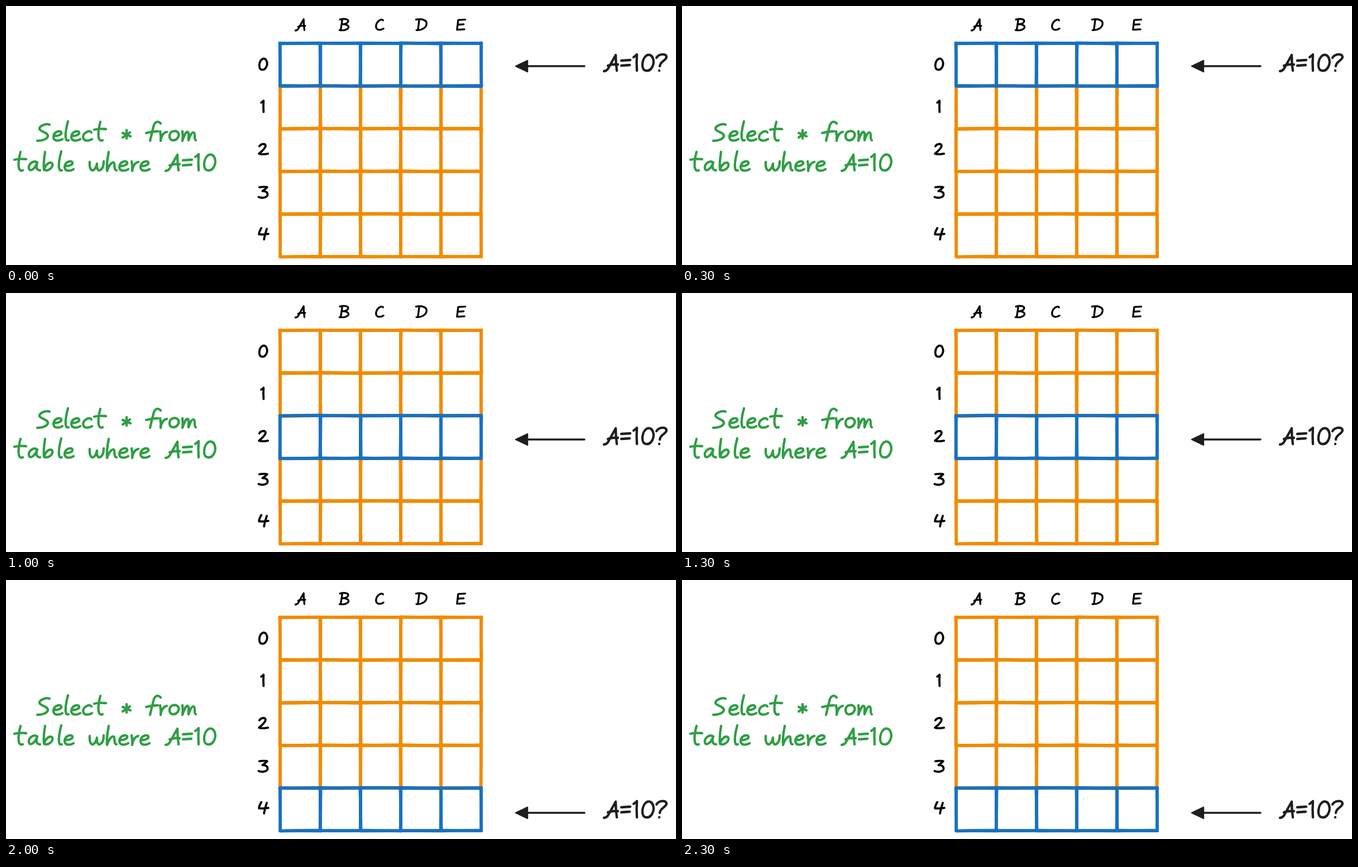
An HTML page with a canvas that plays this animation: 1200 px wide and 465 px high, repeating every 2500 ms.

```html
<!DOCTYPE html>
<html lang="en">
<head>
<meta charset="utf-8">
<title>Table scan</title>
<style>
html, body { margin: 0; width: 100%; height: 100%; overflow: hidden; background: #fff; }
canvas { display: block; }
</style>
</head>
<body>
<canvas id="stage" width="1200" height="465" role="img" aria-label="Select * from table where A=10"></canvas>
<script>
const ctx = document.getElementById('stage').getContext('2d');
const ORANGE = '#f08c00', BLUE = '#1971c2', GREEN = '#2f9e44', INK = '#1e1e1e';
const STEP = 500, ROWS = 5, COLS = 5;
const LEFT = 491, TOP = 67, CELL_W = 72, CELL_H = 76.6;

// Handwritten pen strokes: [advance, path], baseline at y = 0
const lower = {
  a: [26, 'M18-15C11-20 2-12 3-5C4 3 14-3 18-15C15-6 17-1 23-1'],
  b: [28, 'M6-34C4-22 3-10 4-2C6-10 13-17 18-14C23-8 12 2 4-2'],
  c: [20, 'M17-15C14-20 3-15 2-7C2 1 12 1 18-3'],
  e: [21, 'M3-9C9-8 17-11 16-15C14-20 2-16 2-7C2 1 12 1 18-3'],
  f: [23, 'M27-31C22-37 16-34 14-25L8 0M1-14C8-16 16-17 22-17'],
  h: [23, 'M6-34C4-24 2-10 3 0C5-8 11-16 15-15C18-13 14-2 20-1'],
  l: [11, 'M7-35C4-24 2-12 3-5C4-1 5 0 8-1'],
  m: [30, 'M3-17C4-10 4-6 3 0C6-10 10-16 12-16C16-15 13-6 14-1C17-10 20-16 23-15C27-14 23-2 27-1'],
  o: [23, 'M10-17C2-17 0-3 8-1C17 0 22-10 18-15C15-18 12-18 10-17'],
  r: [17, 'M3-17Q5-8 4 0Q6-14 15-16'],
  t: [25, 'M13-34C10-24 8-8 11-3Q13 1 17-1M2-20Q12-22 23-21'],
  w: [30, 'M2-16C1-6 4 0 8-1C12-3 14-8 15-13C14-4 17 0 20-1C25-3 27-10 27-17']
};
const upper = {
  A: [30, 'M2 0Q6 0 9-4L23-29Q23-15 25-1M9-10Q18-13 27-12'],
  B: [30, 'M9-28L5-1M3-28C14-32 26-29 24-23C22-18 16-16 9-16C20-17 28-11 24-6C18 0 8 0 2-1'],
  C: [24, 'M22-26C16-33 3-20 4-9C5 1 17-1 23-5'],
  D: [32, 'M10-27L7-2M2-28C16-31 30-27 29-17C28-7 16 0 3-1'],
  E: [28, 'M25-28L7-27L4-2L23-3M6-15L21-16'],
  S: [30, 'M25-29C18-32 6-26 7-21C9-16 23-15 22-8C20-2 10 0 3 0']
};
const signs = {
  ' ': [24, ''],
  '*': [21, 'M11-19V-4M4-14L18-8M17-15L4-6'],
  '=': [22, 'M3-19L19-20M3-10L18-11'],
  '?': [20, 'M2-24C6-31 20-33 20-25C18-18 9-18 8-9M7-1v.2'],
  0: [27, 'M13-29C3-25 0-3 10-1C20 1 26-13 23-22C21-29 16-30 13-29'],
  1: [15, 'M3-25Q6-27 9-30Q8-15 9-1'],
  2: [28, 'M4-23C8-30 18-31 20-25C20-18 9-9 3-4C12-1 18-3 26-4'],
  3: [28, 'M4-28C10-29 18-30 24-28C20-24 15-20 12-18C20-19 26-14 25-8C23 0 8 0 2-3'],
  4: [28, 'M9-29C6-24 3-18 3-13C12-12 20-13 27-14M23-27C20-18 17-8 16 0']
};
const font = { ...lower, ...upper, ...signs };
const pens = {};
for (const ch in font) pens[ch] = new Path2D(font[ch][1]);

function write(text, x, y, color, scale = 1, weight = 4.3) {
  ctx.save();
  ctx.translate(x, y);
  ctx.scale(scale, scale);
  ctx.strokeStyle = color;
  ctx.lineWidth = weight / scale;
  for (const ch of text) {
    ctx.stroke(pens[ch]);
    ctx.translate(font[ch][0], 0);
  }
  ctx.restore();
}

function randomizer(seed) {
  return () => {
    seed = (seed * 16807) % 2147483647;
    return seed / 2147483647 - 0.5;
  };
}

// A side is two overlapping strokes with a slight wobble
function side(x1, y1, x2, y2, rnd) {
  const wob = () => rnd() * 1.2;
  for (let i = 0; i < 2; i++) {
    ctx.beginPath();
    ctx.moveTo(x1 + wob(), y1 + wob());
    ctx.quadraticCurveTo((x1 + x2) / 2 + wob(), (y1 + y2) / 2 + wob(), x2 + wob(), y2 + wob());
    ctx.stroke();
  }
}

function drawRow(row, color) {
  ctx.strokeStyle = color;
  ctx.lineWidth = 5.6;
  const y = TOP + row * CELL_H, b = y + CELL_H;
  for (let col = 0; col < COLS; col++) {
    const rnd = randomizer(911 + row * 7001 + col * 1327);
    const x = LEFT + col * CELL_W, r = x + CELL_W;
    side(x, y, r, y, rnd);
    side(r, y, r, b, rnd);
    side(r, b, x, b, rnd);
    side(x, b, x, y, rnd);
  }
}

function drawArrow(y) {
  ctx.strokeStyle = ctx.fillStyle = INK;
  ctx.lineWidth = 3.4;
  ctx.beginPath();
  ctx.moveTo(1036, y);
  ctx.lineTo(934, y);
  ctx.stroke();
  ctx.lineWidth = 2.4;
  ctx.beginPath();
  ctx.moveTo(913, y);
  ctx.lineTo(934, y - 10);
  ctx.lineTo(934, y + 10);
  ctx.closePath();
  ctx.fill();
  ctx.stroke();
}

const heads = { A: 517, B: 596, C: 660, D: 733, E: 805 };
const rowBase = [115, 191, 268, 345, 419];
const arrowY = [108, 170, 263, 325, 418];

function draw(now) {
  const active = Math.floor(now / STEP) % ROWS;
  ctx.fillStyle = '#fff';
  ctx.fillRect(0, 0, 1200, 465);
  ctx.lineCap = ctx.lineJoin = 'round';

  write('Select * from', 53, 242, GREEN);
  write('table where A=10', 13, 296, GREEN);
  for (const ch in heads) write(ch, heads[ch], 44, '#000', 0.7, 3.3);
  rowBase.forEach((y, i) => write(String(i), i === 1 ? 455 : 451, y, '#000', 0.7, 3.8));

  for (let row = 0; row < ROWS; row++) if (row !== active) drawRow(row, ORANGE);
  drawRow(active, BLUE);

  drawArrow(arrowY[active]);
  write('A=10?', 1069, arrowY[active] + 9, INK);
}

function tick() {
  draw(performance.now() - start);
  requestAnimationFrame(tick);
}
const start = performance.now();
tick();
</script>
</body>
</html>
```
